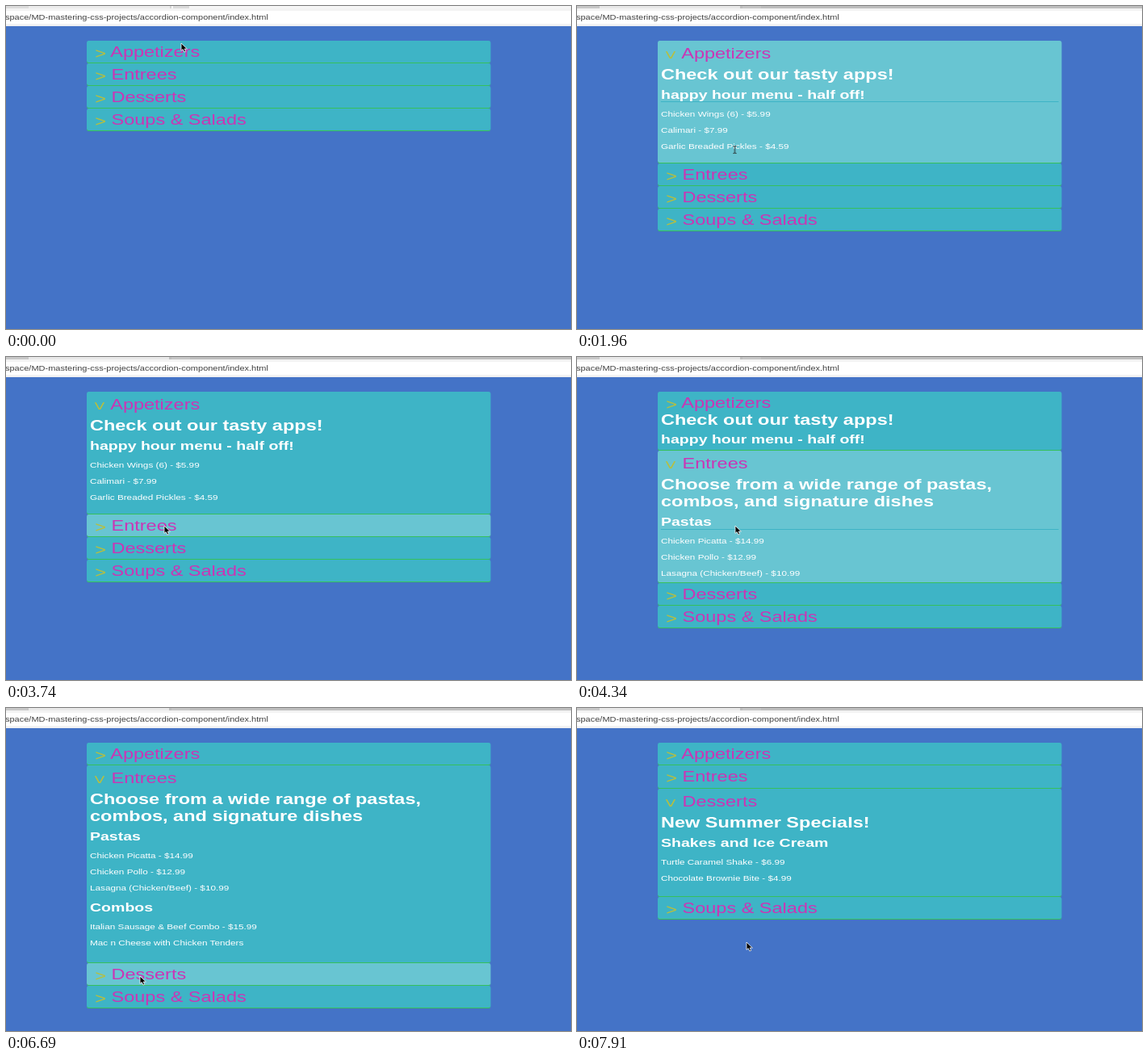
Recreate the animation shown at these times as an HTML page. Size 700 px wide and 400 px high, loop 8 s.

```html
<!DOCTYPE html>
<html lang="en">
<head>
<meta charset="utf-8">
<title>Menu accordion</title>
<style>
:root {
  --wide: 1.28; /* the whole screen is shown stretched sideways */
  --card: #3eb4c6;
  --lit: #68c5d2;
}
* { box-sizing: border-box; margin: 0; padding: 0; }
html, body { width: 700px; height: 400px; overflow: hidden; }
body {
  position: relative;
  background: #4473c7;
  font-family: "Liberation Sans", Arial, sans-serif;
}
.strip, .bar, .menu, .cursor, .cursor > * { position: absolute; }
.strip, .item, .body, .cursor {
  animation-duration: 8s;
  animation-iteration-count: infinite;
  animation-timing-function: linear;
}

/* Browser window */
.bar {
  top: 3px; width: 700px; height: 22px;
  background: #f3f3f3;
  border-bottom: 1px solid #e9ecf1;
}
.url {
  position: absolute; top: 3px; width: 700px; height: 16px;
  background: #fff;
}
.url span {
  position: absolute; left: -1px;
  font-size: 8.6px; line-height: 16px; color: #404040;
  white-space: nowrap;
  transform: scaleX(var(--wide)); transform-origin: 0 0;
}
.strip {
  width: 700px; height: 3px;
  animation-name: focus;
  animation-timing-function: step-end;
}
@keyframes focus {
  0% { background: linear-gradient(90deg, #dcdcdc 28px, #ececec 0 203px, #d2d2d2 0 205px, #f6f6f6 0 207px, #dadada 0 227px, #f6f6f6 0); }
  5.75%, 100% { background: linear-gradient(90deg, #c8c8c8 28px, #e8e8e8 0 202px, #bebebe 0 205px, #c6c6c6 0 228px, #bebebe 0); }
}

/* Accordion */
.menu {
  left: 100px; top: 43px;
  width: calc(501px / var(--wide));
  transform: scaleX(var(--wide)); transform-origin: 0 0;
  color: #fff;
}
.item {
  --o: 0;
  background: var(--card);
  border-bottom: 1px solid #36c05c;
  border-radius: 2px / 3px;
}
h1 {
  height: calc(27px + 7.5px * var(--o));
  padding-left: 8px;
  font-size: 18.36px; font-weight: 400; line-height: 28px;
  color: #cb35b5;
  white-space: pre;
}
h1 span { position: relative; top: calc(2px * var(--o)); }
h1 i {
  display: inline-block;
  font-style: normal; line-height: 21px; color: #b9bf3c;
  transform: translate(calc(-1px * var(--o)), 2px) rotate(calc(90deg * var(--o)));
}
.body { height: 0; overflow: hidden; padding: 0 3.1px; }
h2 { margin: -3.5px 0 5.8px; font-size: 18.36px; line-height: 21.1px; }
h3 {
  margin: 4.4px 0 5.5px;
  border-bottom: 1px solid var(--card);
  font-size: 15.27px; line-height: 17.6px;
}
p { font-size: 9.18px; line-height: 19.8px; }

.item { animation-timing-function: step-end, linear; }
.item:nth-child(1) { --h: 116.5px; animation-name: open1, lit1; }
.item:nth-child(2) { --h: 209.5px; animation-name: open2, lit2; }
.item:nth-child(3) { --h: 99px; animation-name: open3, lit3; }
.item:nth-child(4) { animation-name: none, lit4; }
.body { animation-timing-function: ease; }
.item:nth-child(1) .body { animation-name: grow1; }
.item:nth-child(2) .body { animation-name: grow2; }
.item:nth-child(3) .body { animation-name: grow3; }

@keyframes open1 { 0% { --o: 0 } 13.19% { --o: 1 } 49.7%, 100% { --o: 0 } }
@keyframes open2 { 0% { --o: 0 } 49.7% { --o: 1 } 87.5%, 100% { --o: 0 } }
@keyframes open3 { 0% { --o: 0 } 87.5%, 100% { --o: 1 } }

@keyframes grow1 {
  0%, 13.19% { height: 0 }
  25.19%, 49.7% { height: var(--h) }
  61.7%, 100% { height: 0 }
}
@keyframes grow2 {
  0%, 49.7% { height: 0 }
  61.7%, 87.5% { height: var(--h) }
  99.5%, 100% { height: 0 }
}
@keyframes grow3 {
  0%, 87.5% { height: 0 }
  99.5%, 100% { height: var(--h) }
}

/* Hover tint follows the pointer */
@keyframes lit1 {
  0%, 13.19%, 29.75%, 36.375%, 46.25%, 100% { background-color: var(--card) }
  15.69%, 27.25%, 39%, 42% { background-color: var(--lit) }
}
@keyframes lit2 {
  0%, 27.25%, 39%, 42%, 83.25%, 100% { background-color: var(--card) }
  29.75%, 36.375%, 46.25%, 79% { background-color: var(--lit) }
}
@keyframes lit3 {
  0%, 79%, 91%, 100% { background-color: var(--card) }
  83.25%, 89% { background-color: var(--lit) }
}
@keyframes lit4 {
  0%, 89%, 96%, 100% { background-color: var(--card) }
  91%, 93.75% { background-color: var(--lit) }
}

/* Pointer */
.cursor {
  --b: 0;
  left: 0; top: 0; width: 0; height: 0;
  animation-name: travel, beam;
  animation-timing-function: linear, step-end;
}
.cursor svg { left: -4px; top: -8px; overflow: visible; }
.arrow { opacity: calc(1 - var(--b)); }
.beam { opacity: var(--b); }
@keyframes travel {
  0%, 1.8% { transform: translate(217px, 46px) }
  2%, 13.5% { transform: translate(219px, 55px) }
  17% { transform: translate(212px, 92px) }
  22.5%, 27% { transform: translate(195.5px, 178px) }
  28% { transform: translate(196px, 202px) }
  29.5%, 36.3% { transform: translate(197px, 206px) }
  39%, 42% { transform: translate(197.5px, 170px) }
  44.5%, 55% { transform: translate(196px, 209px) }
  61% { transform: translate(195px, 240px) }
  63% { transform: translate(194px, 243px) }
  65% { transform: translate(196px, 236px) }
  67.5% { transform: translate(185px, 208px) }
  69.5% { transform: translate(152px, 180px) }
  72% { transform: translate(122px, 200px) }
  74.5% { transform: translate(110px, 242px) }
  76.3% { transform: translate(105px, 285px) }
  77.9% { transform: translate(100px, 314px) }
  79.8% { transform: translate(125px, 322px) }
  81.7% { transform: translate(155px, 330px) }
  83.4%, 88.5% { transform: translate(166px, 332px) }
  92.7% { transform: translate(182px, 317px) }
  98%, 100% { transform: translate(210px, 290px) }
}
@keyframes beam {
  0% { --b: 0 }
  15.5% { --b: 1 }
  27.5% { --b: 0 }
  37% { --b: 1 }
  42.3%, 100% { --b: 0 }
}
</style>
</head>
<body>
<div class="strip"></div>
<div class="bar"><div class="url"><span>space/MD-mastering-css-projects/accordion-component/index.html</span></div></div>

<main class="menu">
  <section class="item">
    <h1><span><i>&gt;</i> Appetizers</span></h1>
    <div class="body">
      <h2>Check out our tasty apps!</h2>
      <h3>happy hour menu - half off!</h3>
      <p>Chicken Wings (6) - $5.99</p>
      <p>Calimari - $7.99</p>
      <p>Garlic Breaded Pickles - $4.59</p>
    </div>
  </section>
  <section class="item">
    <h1><span><i>&gt;</i> Entrees</span></h1>
    <div class="body">
      <h2>Choose from a wide range of pastas,<br>combos, and signature dishes</h2>
      <h3>Pastas</h3>
      <p>Chicken Picatta - $14.99</p>
      <p>Chicken Pollo - $12.99</p>
      <p>Lasagna (Chicken/Beef) - $10.99</p>
      <h3>Combos</h3>
      <p>Italian Sausage &amp; Beef Combo - $15.99</p>
      <p>Mac n Cheese with Chicken Tenders</p>
    </div>
  </section>
  <section class="item">
    <h1><span><i>&gt;</i> Desserts</span></h1>
    <div class="body">
      <h2>New Summer Specials!</h2>
      <h3>Shakes and Ice Cream</h3>
      <p>Turtle Caramel Shake - $6.99</p>
      <p>Chocolate Brownie Bite - $4.99</p>
    </div>
  </section>
  <section class="item">
    <h1><span><i>&gt;</i> Soups &amp; Salads</span></h1>
  </section>
</main>

<div class="cursor">
  <svg width="16" height="24" viewBox="-4 -8 16 24">
    <path class="arrow" d="M0 0V9.4L2.2 7.6 3.9 11 5.7 10.3 4.2 7H7.4Z" fill="#000" stroke="#fff" stroke-width=".8"/>
    <path class="beam" d="M-2-4.5Q0-4.5 0-3.5Q0-4.5 2-4.5M0-3.5V3.5M-2 4.5Q0 4.5 0 3.5Q0 4.5 2 4.5" fill="none" stroke="#222"/>
  </svg>
</div>

<script>
const LOOP = 8000, STEP = 147.8, OFFSET = 30;
const moves = document.getAnimations();
moves.forEach(m => m.pause());
const start = performance.now();

function draw() {
  const t = (performance.now() - start) % LOOP;
  const grab = Math.max(0, OFFSET + Math.floor((t - OFFSET) / STEP) * STEP);
  moves.forEach(m => { m.currentTime = grab; });
  requestAnimationFrame(draw);
}
draw();
</script>
</body>
</html>
```
